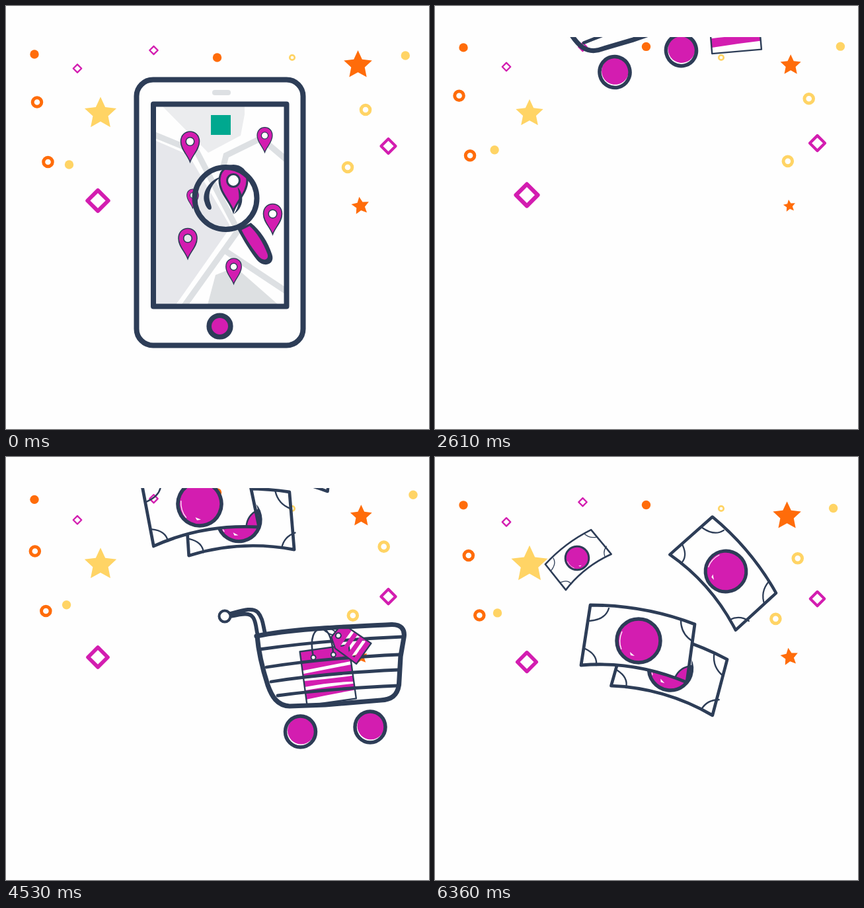
Recreate the animation shown at these times as an HTML page. Size 640 by 640 pixels, loop 6.39 s.

```html
<!DOCTYPE html>
<html lang="en">
<head>
<meta charset="utf-8">
<title>Shopping loop</title>
<style>
html, body { margin: 0; width: 100%; height: 100%; overflow: hidden; background: #fefefe; }
svg { display: block; width: 100vw; height: 100vh; }
.ink { fill: none; stroke: #2d3d57; stroke-linecap: round; stroke-linejoin: round; }
.navy { fill: #2d3d57; }
.pink { fill: #d31db0; }
.white { fill: #fefefe; }
.road { fill: none; stroke: #dde0e3; stroke-width: 9; }
</style>
</head>
<body>
<svg viewBox="0 0 640 640">
  <defs>
    <clipPath id="stage"><rect y="47" width="640" height="593"/></clipPath>
    <clipPath id="screen"><rect x="223" y="148" width="201" height="306"/></clipPath>
    <clipPath id="behind">
      <path clip-rule="evenodd" d="M-400-400H400V400H-400Z M-73-54Q9-54 85-25L80 38Q62 40 55 56Q-10 32-87 37Z"/>
    </clipPath>
    <path id="tagShape" d="M22-68L38-71L75-55L59-20L23-37L14-53Z"/>
    <mask id="tagStripes" maskUnits="userSpaceOnUse" x="0" y="-90" width="90" height="90">
      <path fill="#fff" d="M0-90H90V0H0Z"/>
      <path stroke="#000" stroke-width="4.5" d="M32-41L44-67M42-36L54-62M52-30L64-57"/>
    </mask>
    <g id="bill">
      <path class="ink" stroke-width="4.8" d="M-73-54Q9-54 85-25L73 63Q-5 30-87 37Z"/>
      <path class="ink" stroke-width="2.4" d="M-45-49Q-50-32-74-30M64-31Q64-10 82 1M55 56Q62 40 80 38M-81 12Q-62 21-64 37"/>
      <circle class="pink" r="32"/>
      <circle class="ink" r="33" stroke-width="5.5"/>
      <path fill="none" stroke="#fefefe" stroke-width="1.3" d="M-25-14Q-31 0-26 13"/>
      <path class="white" d="M-13 17L-6 23L-12 22Z"/>
    </g>
    <g id="wheel">
      <circle class="pink" cx="1" cy="-1.5" r="20.5"/>
      <ellipse class="ink" rx="23" ry="23.5" stroke-width="5.5"/>
    </g>
  </defs>

  <g id="confetti"></g>

  <g clip-path="url(#stage)">
    <g id="phone">
      <rect class="ink" x="197.5" y="111.5" width="252" height="402" rx="25" stroke-width="8" style="fill:#fefefe"/>
      <rect x="312" y="127" width="28" height="8" rx="4" fill="#dde0e3"/>
      <g clip-path="url(#screen)">
        <path fill="#ebecee" d="M237 152H361V164L355 196L306 222Z"/>
        <path fill="#e6e7eb" d="M227 204L271 223L282 235L338 331V337L257 452H227Z"/>
        <path fill="#dde0e2" d="M305 452L317 407L347 395L412 452Z"/>
        <path class="road" d="M225 195L289 221L351 340L268 456M328 246L333 226L386 200L426 234M331 370L426 433"/>
      </g>
      <rect x="310" y="165" width="30" height="30" fill="#00a88f"/>
      <g id="pins"></g>
      <rect class="ink" x="223" y="148.5" width="201.5" height="306" stroke-width="8"/>
      <circle class="ink" cx="323.5" cy="484.5" r="16.3" stroke-width="7.6" style="fill:#d31db0"/>
      <g id="lens">
        <path class="navy" d="M18 47L38 37C52 48 64 66 70 85C75 100 58 106 47 93C38 82 27 64 18 47Z"/>
        <path class="pink" d="M24 48L36 42C46 50 57 68 63 84C66 93 57 96 50 88C42 78 32 64 24 48Z"/>
        <circle class="ink" r="47" stroke-width="8"/>
        <path class="navy" d="M-6-33C-24-29-37-9-32 6C-30 14-25 20-22 16C-20 12-26 5-25-5C-24-16-17-26-6-33Z"/>
        <path class="navy" d="M18-17C28-6 28 14 12 24C20 14 22 0 18-17Z"/>
      </g>
    </g>

    <g id="shop">
      <g id="bag">
        <path class="pink" d="M-37-41H37V28Q0 29-37 32Z"/>
        <path class="white" d="M-37-12L37-16V-11L-37-7ZM-37 0L37 2V6Q0 6-37 4ZM-37 13Q0 11 37 15V18Q0 17-37 18Z"/>
        <path class="ink" stroke-width="2.4" d="M-37-41H37.5V41H-37.5Z"/>
        <path class="ink" stroke-width="2.6" d="M-18-30C-20-62-10-71-1-71C10-71 14-55 12.6-30"/>
        <g class="ink" stroke-width="2" style="fill:#fefefe">
          <circle cx="-18" cy="-29.5" r="3.5"/><circle cx="12.6" cy="-29.5" r="3.5"/>
        </g>
      </g>
      <g id="cart">
        <path class="ink" stroke-width="7.2" d="M196 271C250 260 330 257 400 253.5C415 253 421 261 419 273L414 302L411.5 345C409 361 400 367 384 368L300 375L246 377C227 376 219 362 213 345C205 320 199 295 197 271"/>
        <path class="ink" stroke-width="4.8" d="M201 291Q300 277 417 272M211 318Q300 304 412 299M218 340Q300 327 411 322M228 361Q300 351 410 346"/>
        <path class="ink" stroke-width="5.8" d="M156 237C175 232 190 227 198 235C206 244 206 256 209 267M157 241C175 237 186 235 191 243C196 251 195 260 198 270"/>
        <circle class="ink" cx="148" cy="241" r="8.5" stroke-width="4" style="fill:#fefefe"/>
        <use href="#wheel" x="262.5" y="415.5"/>
        <use href="#wheel" x="368" y="408.5"/>
      </g>
      <g id="tag">
        <path class="ink" stroke-width="1.6" d="M0-71C12-73 20-66 24-57M2-70C8-62 16-58 24-57"/>
        <g id="tagBody">
          <use href="#tagShape" class="pink" mask="url(#tagStripes)"/>
          <use href="#tagShape" class="ink" stroke-width="2.2"/>
          <circle class="ink" cx="24" cy="-57" r="4" stroke-width="2" style="fill:#fefefe"/>
        </g>
      </g>
    </g>

    <g id="money">
      <g id="pair">
        <g clip-path="url(#behind)"><use href="#bill" transform="translate(48 42.5) rotate(7) scale(.985)"/></g>
        <use href="#bill"/>
      </g>
      <g id="large"><use href="#bill" transform="scale(.935)"/></g>
      <g id="small"><use href="#bill" transform="scale(.54)"/></g>
    </g>
  </g>
</svg>

<script>
const LOOP = 6390, STEP = 30;
const ORANGE = '#ff6c0a', YELLOW = '#ffd465', PINK = '#d31db0', NAVY = '#2d3d57';
const $ = id => document.getElementById(id);

function add(parent, tag, attrs) {
  const el = document.createElementNS('http://www.w3.org/2000/svg', tag);
  for (const k in attrs) el.setAttribute(k, attrs[k]);
  return parent.appendChild(el);
}

function place(el, x, y, turn = 0, scale = 1) {
  el.setAttribute('transform', `translate(${x} ${y}) rotate(${turn}) scale(${scale})`);
}

const show = (el, on) => { el.style.display = on ? '' : 'none'; };
const clamp = v => Math.min(1, Math.max(0, v));
const ease = v => v * v * (3 - 2 * v);
const mix = (a, b, p) => a + (b - a) * p;
// Ease out with a slight overshoot
const settle = v => 1 + 1.7 * (v - 1) ** 3 + .7 * (v - 1) ** 2;

// Rises evenly to 1 at `peak`, then falls evenly to `end`, with a rounded turn
function swing(t, { peak, fall, end }) {
  const up = t / peak, down = 1 - (1 - end) * Math.min(1, (t - peak) / fall);
  const round = .14, near = Math.max(0, round - Math.abs(up - down));
  return Math.min(up, down) - near * near / (4 * round);
}

const star = r => Array.from({ length: 10 }, (_, i) => {
  const a = i * Math.PI / 5, q = i % 2 ? r * .48 : r;
  return `${q * Math.sin(a)},${-q * Math.cos(a)}`;
}).join(' ');

const shapes = {
  dot: (g, c, r = 6.7) => add(g, 'circle', { r, fill: c }),
  ring: (g, c, r = 6.8) => add(g, 'circle', { r, fill: 'none', stroke: c, 'stroke-width': r * .73 }),
  star: (g, c, r) => add(g, 'polygon', { points: star(r), fill: c }),
  diamond: (g, c, r) => add(g, 'path', {
    d: `M0 ${-r}L${r} 0L0 ${r}L${-r} 0Z`, fill: 'none', stroke: c,
    'stroke-width': r * .38, 'stroke-linejoin': 'round'
  })
};

const confetti = [];
function piece(kind, color, x, y, { r, turn = 0, dx = 0, dy = 0, grow = 0, peak = 3480, end = 0, fall = LOOP - peak }) {
  const el = add($('confetti'), 'g', {});
  shapes[kind](el, color, r);
  confetti.push(t => {
    const p = swing(t, { peak, fall, end });
    place(el, x + dx * p, y + dy * p, turn, 1 + grow * p);
  });
}

piece('dot', ORANGE, 43, 73, { dy: -13.5 });
piece('dot', ORANGE, 319.5, 78, { dy: -27, peak: 4250, end: .19 });
piece('dot', YELLOW, 604.3, 75, { dx: 14.5, dy: -22, peak: 4150, end: -.13 });
piece('dot', YELLOW, 95.5, 240, { dx: -6.3, dy: -26, peak: 3050, end: .15 });
piece('ring', ORANGE, 47, 145.5, { dx: -14.5, dy: -13.5, peak: 1550, end: -.27 });
piece('ring', ORANGE, 63.5, 236, { dx: -14.5, dy: -13.5, peak: 1550, end: -.27 });
piece('ring', YELLOW, 544, 157, { dx: 33.7, dy: -26, peak: 4050, end: .13 });
piece('ring', YELLOW, 517, 244, { dx: 17.5, dy: -9.5, peak: 2650, end: -.1 });
piece('ring', YELLOW, 433, 78, { r: 3.7 });
piece('diamond', PINK, 108, 94.5, { r: 6.2, dy: -3, peak: 2300, end: -1.3 });
piece('diamond', PINK, 223.5, 67, { r: 6.2, dy: -6.7, end: -.2 });
piece('diamond', PINK, 139, 294.5, { r: 15.7, dy: -12.5, grow: .07, peak: 2150, end: -1.25, fall: 3200 });
piece('diamond', PINK, 578.5, 212, { r: 11, dy: -6.5, grow: .06, peak: 1500, end: -.4 });
piece('star', ORANGE, 532.5, 89.5, { r: 22.4, dx: 7.5, grow: -.36 });
piece('star', YELLOW, 143, 162.7, { r: 25.3, grow: -.22, peak: 1550, end: -.67 });
piece('star', ORANGE, 536.3, 302.5, { r: 14, turn: -8, grow: -.35, peak: 2900 });

function pin(x, y, scale = 1, hole = '#fefefe') {
  const g = add($('pins'), 'g', { stroke: NAVY, 'stroke-width': scale > 1 ? 2 : 1.6 });
  add(g, 'path', { d: 'M0 31C-4 20-14 12-14 0C-14-20 14-20 14 0C14 12 4 20 0 31Z', fill: PINK });
  add(g, 'circle', { r: 6.3, fill: hole });
  place(g, x, y, 0, scale);
}

pin(278.5, 205);
pin(391.5, 196, .82);
pin(403.5, 314.5);
pin(275, 351.5, 1, '#e6e7eb');
pin(344.5, 394.5, .84);
pin(282.5, 286.5, .63, '#e6e7eb');
pin(344, 264, 1.5);

function drawPhone(t) {
  show($('phone'), t < 2520);
  const out = Math.max(0, t - 1980) / 510, p = ease(clamp(t / 1680));
  $('phone').setAttribute('transform',
    `translate(${.5 * p - 480 * out * out}) rotate(${-4 * clamp(out)} 324 312)`);
  place($('lens'), mix(332.5, 265, p), mix(291, 337.5, p), 2.5 * p);
}

function drawShop(t) {
  show($('shop'), t > 2490 && t < 5300);
  const roll = 183 * (Math.max(0, t - 3840) / 690) ** 2;
  const high = 1 - settle(clamp((t - 2520) / 660));
  $('cart').setAttribute('transform',
    `translate(${12 * high + roll} ${-573 * high}) rotate(${-25 * high} 315 411.5)`);

  // The bag tumbles down to the rim, then tips into the cart
  const drop = (t - 2610) / 870, tip = ease(clamp((t - 3480) / 360));
  const fall = Math.min(1, drop);
  const x = mix(mix(453, 403, fall), 304, tip) + roll;
  const y = mix(mix(28, 205.6, fall), 330, tip);
  const turn = mix(mix(-5, 25, fall), -8, tip);
  place($('bag'), x, y, turn);
  place($('tag'), x, y, turn);
  $('tagBody').setAttribute('transform', `rotate(${19 * tip} 24 -57)`);
}

// Floats down to rest: height fades by `power`, with a sideways sway
function float(id, t, { x, y, turn, dx = 0, dy, spin, sway = 0, power }) {
  const u = Math.max(0, 6360 - t) / 1830;
  place($(id), x + dx * u + sway * Math.sin(Math.PI * u), y + dy * u ** power, turn + spin * u ** 5);
}

function drawMoney(t) {
  show($('money'), t > 4200);
  float('pair', t, { x: 308, y: 278, turn: 0, dx: -15, dy: -207, spin: -19.5, sway: -14, power: 3.3 });
  float('large', t, { x: 440, y: 173, turn: 39.7, dx: -24, dy: -177, spin: -42, sway: 10.5, power: 1.17 });
  float('small', t, { x: 215, y: 153, turn: -47.4, dy: -170, spin: -30, power: 2.2 });
}

const start = performance.now();
function frame() {
  const t = Math.floor((performance.now() - start) % LOOP / STEP) * STEP;
  confetti.forEach(move => move(t));
  drawPhone(t);
  drawShop(t);
  drawMoney(t);
  requestAnimationFrame(frame);
}
frame();
</script>
</body>
</html>
```
